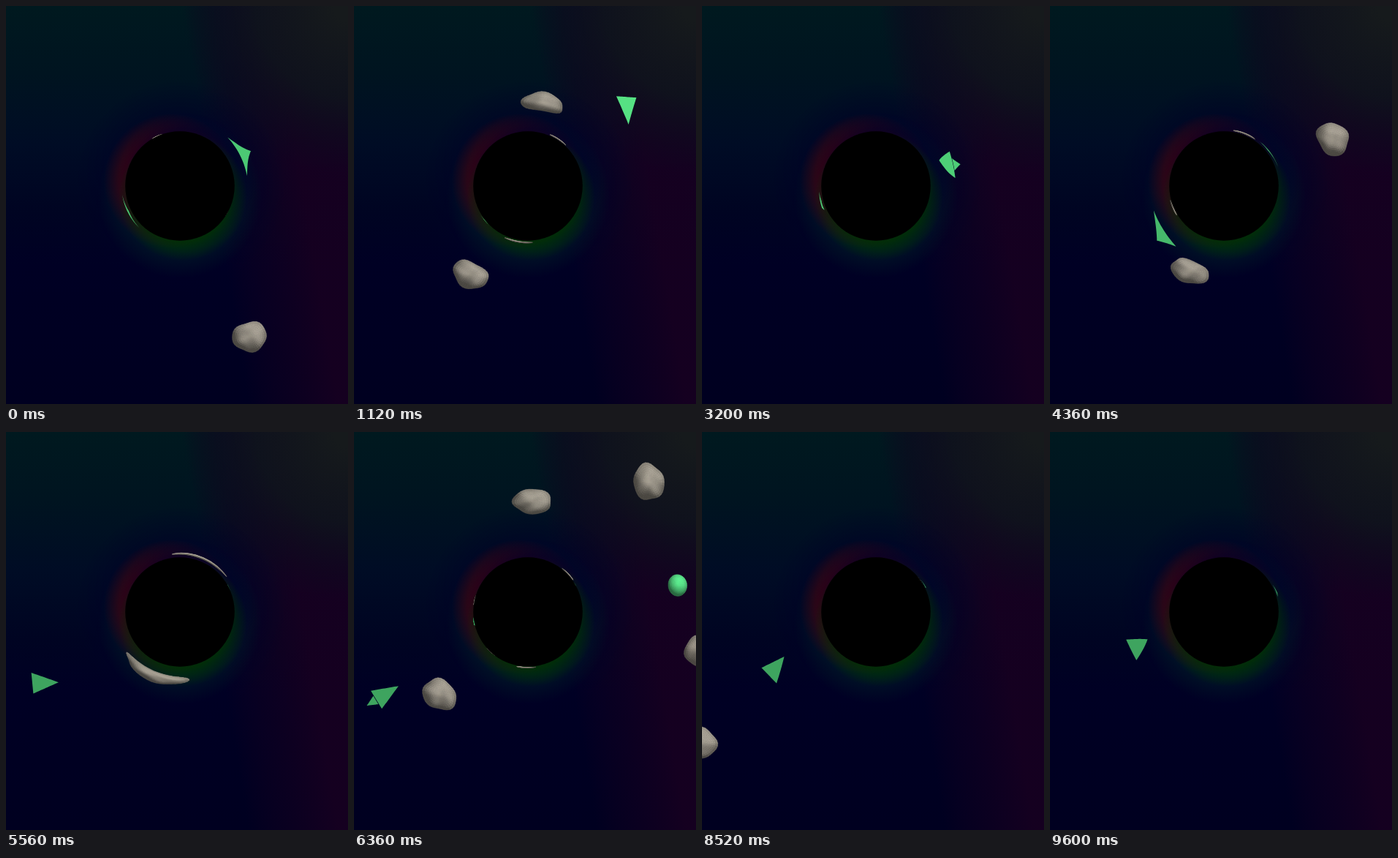
Write an HTML page with a canvas that moves like this. It is 468 px wide and 544 px high and loops after 9640 ms.

```html
<!DOCTYPE html>
<html lang="en">
<head>
<meta charset="utf-8">
<title>Black hole</title>
<style>
html, body { margin: 0; width: 100%; height: 100%; overflow: hidden; background: #000; }
canvas { display: block; }
</style>
</head>
<body>
<canvas id="stage" width="468" height="544"></canvas>
<script>
const W = 468, H = 544, LOOP = 9640, STEP = 40;
const ctx = document.getElementById('stage').getContext('2d');
const hole = { x: 238, y: 246, r: 74.8, core: 71, bend: 1079 };

// Keys: time (s), x, y, heading (degrees), brightness
const shipPath = [
  [0, 292, 219, -25, .82], [1.12, 365.5, 149.5, 90, .92], [2, 400, 140, 138, .9],
  [3.2, 298, 226.6, 172, .84], [5.56, 61, 339, 356, .67], [6.36, 52, 353, 328.4, .67],
  [7.68, 91, 335, 305, .67], [9.6, 142.5, 283, 332, .67]
];
const thrusts = [[1.7, 3.4], [5.9, 6.9]];

const rock = (from, to, seed, path, rx = 23, ry = 21) =>
  ({ from, to, seed, path, rx, ry, bump: 1, color: [203, 195, 179] });
// Straight course through (x, y) at time t
const course = (t, x, y, vx, vy) => [[t, x, y], [t + 1, x + vx, y + vy]];

const bodies = [
  rock(0, 2.6, 1, course(1.12, 167, 355, -146, -81)),
  rock(0, 2.3, 2.4, course(1.12, 254, 156, 255, 60), 23, 20),
  rock(0.04, 1, 4, course(.5, 454, 530, 190, -190)),
  rock(2.04, 3.1, 3, course(2.6, 45, 505, -190, -170)),
  rock(3.3, 5.5, 5, course(4, 274, 429, -210, -235)),
  rock(3.3, 9.04, 6.3, [[3.5, 490, 113], [4.04, 418, 159], [5.56, 220, 289],
    [6.36, 125.5, 351], [7.68, 55, 392], [9, -32, 440]], 23.5, 21.5),
  rock(6.04, 7.04, 7.1, course(6.36, 243.5, 108.5, 10, -130), 24, 20),
  rock(6.04, 7.04, 8.6, course(6.36, 399, 73, 70, -70), 21, 25),
  rock(6.04, 7.04, 9.5, course(6.36, 466, 297.5, 80, 0), 20, 21),
  { from: 6.04, to: 8.02, seed: 0, path: course(6.36, 435, 211, -11, -112),
    rx: 13.5, ry: 14.2, bump: 0, color: [102, 255, 155] }
];

// Smooth interpolation through keys, straight beyond the ends
function sample(keys, t) {
  const last = keys.length - 1;
  let i = 0;
  while (i < last - 1 && t > keys[i + 1][0]) i++;
  const a = keys[i], b = keys[i + 1], span = b[0] - a[0], u = (t - a[0]) / span;
  const slope = (k, c) => {
    const p = keys[Math.max(k - 1, 0)], n = keys[Math.min(k + 1, last)];
    return (n[c] - p[c]) / (n[0] - p[0]) * span;
  };
  return a.slice(1).map((v, j) => {
    const c = j + 1, d = b[c] - v;
    if (u < 0 || u > 1) return v + d * u;
    const m = slope(i, c), n = slope(i + 1, c);
    return v + m * u + (3 * d - 2 * m - n) * u * u + (m + n - 2 * d) * u * u * u;
  });
}

// Gravitational lens: side 1 is the near image, -1 the mirrored one
function lens([x, y], side) {
  const dx = x - hole.x, dy = y - hole.y;
  const dist = Math.hypot(dx, dy) || 1e-6, b = dist * side;
  const r = (b + hole.core + Math.sqrt((b - hole.core) ** 2 + 4 * hole.bend)) / 2;
  return [hole.x + dx / dist * r * side, hole.y + dy / dist * r * side];
}

function fillPoly(points, color, seam) {
  ctx.beginPath();
  points.forEach(p => ctx.lineTo(p[0], p[1]));
  ctx.closePath();
  ctx.fillStyle = color;
  ctx.fill();
  if (seam) {
    ctx.strokeStyle = color;
    ctx.lineWidth = seam;
    ctx.stroke();
  }
}

function drawBody(o, t) {
  if (t < o.from || t > o.to) return;
  const [cx, cy] = sample(o.path, t);
  if (cx < -60 || cx > W + 60 || cy < -60 || cy > H + 60) return;
  const rings = 9, spokes = 36, spin = o.seed + t * .7;
  const point = (i, j) => {
    const f = j / spokes * Math.PI * 2, g = f - spin;
    const k = i / rings * (1 + o.bump * (.05 * Math.sin(3 * g + o.seed) + .035 * Math.sin(5 * g)));
    return [cx + Math.cos(f) * k * o.rx, cy + Math.sin(f) * k * o.ry];
  };
  const shade = (i, j) => {
    const q = (i + .5) / rings, f = (j + .5) / spokes * Math.PI * 2;
    let x = q * Math.cos(f), y = q * Math.sin(f);
    const z = Math.sqrt(1 - q * q);
    const u = q * Math.cos(f - spin), v = q * Math.sin(f - spin);
    x += o.bump * .2 * Math.sin(6 * u + 2 * v + o.seed);
    y += o.bump * .2 * Math.sin(6 * v - 2 * u + o.seed * 2);
    const light = (.3 * x - .5 * y + .8 * z) / Math.hypot(x, y, z);
    const s = .4 + .5 * Math.max(0, light);
    return `rgb(${o.color.map(c => Math.round(c * s * (o.bump ? .95 : 1.08))).join()})`;
  };
  for (const side of [-1, 1]) {
    const grid = [];
    for (let i = 0; i <= rings; i++) {
      grid.push([]);
      for (let j = 0; j <= spokes; j++) grid[i].push(lens(point(i, j), side));
    }
    for (let i = 0; i < rings; i++) {
      for (let j = 0; j < spokes; j++) {
        fillPoly([grid[i][j], grid[i + 1][j], grid[i + 1][j + 1], grid[i][j + 1]],
          shade(i, j), side > 0 ? .6 : .3);
      }
    }
  }
}

function drawShip(t) {
  const [x, y, deg, bright] = sample(shipPath, t);
  const a = deg * Math.PI / 180, cos = Math.cos(a), sin = Math.sin(a);
  const color = `rgb(${[93, 245, 142].map(c => Math.round(c * bright)).join()})`;
  const parts = [[[18.7, 0], [-18.7, 14], [-18.7, -14]]];
  if (thrusts.some(([from, to]) => t >= from && t <= to)) {
    parts.push([[-19.5, 6.5], [-34.5, 0], [-19.5, -6.5]]);
  }
  for (const side of [-1, 1]) {
    for (const part of parts) {
      const points = [];
      part.forEach((p, i) => {
        const q = part[(i + 1) % 3];
        for (let k = 0; k < 14; k++) {
          const u = p[0] + (q[0] - p[0]) * k / 14, v = p[1] + (q[1] - p[1]) * k / 14;
          points.push(lens([x + u * cos - v * sin, y + u * sin + v * cos], side));
        }
      });
      fillPoly(points, color);
    }
  }
}

function wash(gradient, stops) {
  stops.forEach(([at, color]) => gradient.addColorStop(at, color));
  ctx.fillStyle = gradient;
  ctx.fillRect(0, 0, W, H);
}

function glow(x, y, inner, outer, rgb, alpha) {
  wash(ctx.createRadialGradient(x, y, inner, x, y, outer),
    [[0, `rgba(${rgb},${alpha})`], [1, `rgba(${rgb},0)`]]);
}

function drawSky() {
  wash(ctx.createLinearGradient(0, 0, 0, H),
    [[0, '#00191f'], [.17, '#001420'], [.35, '#000c25'], [.52, '#000422'], [.65, '#000024'], [1, '#000020']]);
  ctx.save();
  ctx.globalCompositeOperation = 'source-over';
  wash(ctx.createLinearGradient(300, 350, 420, 330),
    [[0, 'rgba(22,0,32,0)'], [.35, 'rgba(18,0,32,.45)'], [1, 'rgba(22,0,32,.95)']]);
  ctx.restore();
  wash(ctx.createRadialGradient(W, 0, 20, W, 0, 230),
    [[0, 'rgba(22,26,28,1)'], [.5, 'rgba(14,22,28,.8)'], [1, 'rgba(8,12,30,0)']]);
  glow(hole.x, hole.y, 72, 145, '0,0,38', .8);
  glow(238, 260, 62, 112, '0,36,38', .75);
  glow(226, 239, 64, 92, '70,0,14', .8);
  glow(248, 238, 70, 94, '0,0,40', .65);
  glow(242, 260, 63, 88, '0,54,0', .75);
}

function drawHole() {
  ctx.beginPath();
  ctx.arc(hole.x, hole.y, hole.r, 0, Math.PI * 2);
  ctx.fillStyle = '#000';
  ctx.fill();
}

const sky = document.createElement('canvas');
sky.width = W;
sky.height = H;
drawSky();
sky.getContext('2d').drawImage(ctx.canvas, 0, 0);

function frame(now) {
  const t = Math.floor(now % LOOP / STEP) * STEP / 1000;
  ctx.drawImage(sky, 0, 0);
  bodies.forEach(o => drawBody(o, t));
  drawShip(t);
  drawHole();
  requestAnimationFrame(frame);
}
requestAnimationFrame(frame);
</script>
</body>
</html>
```
